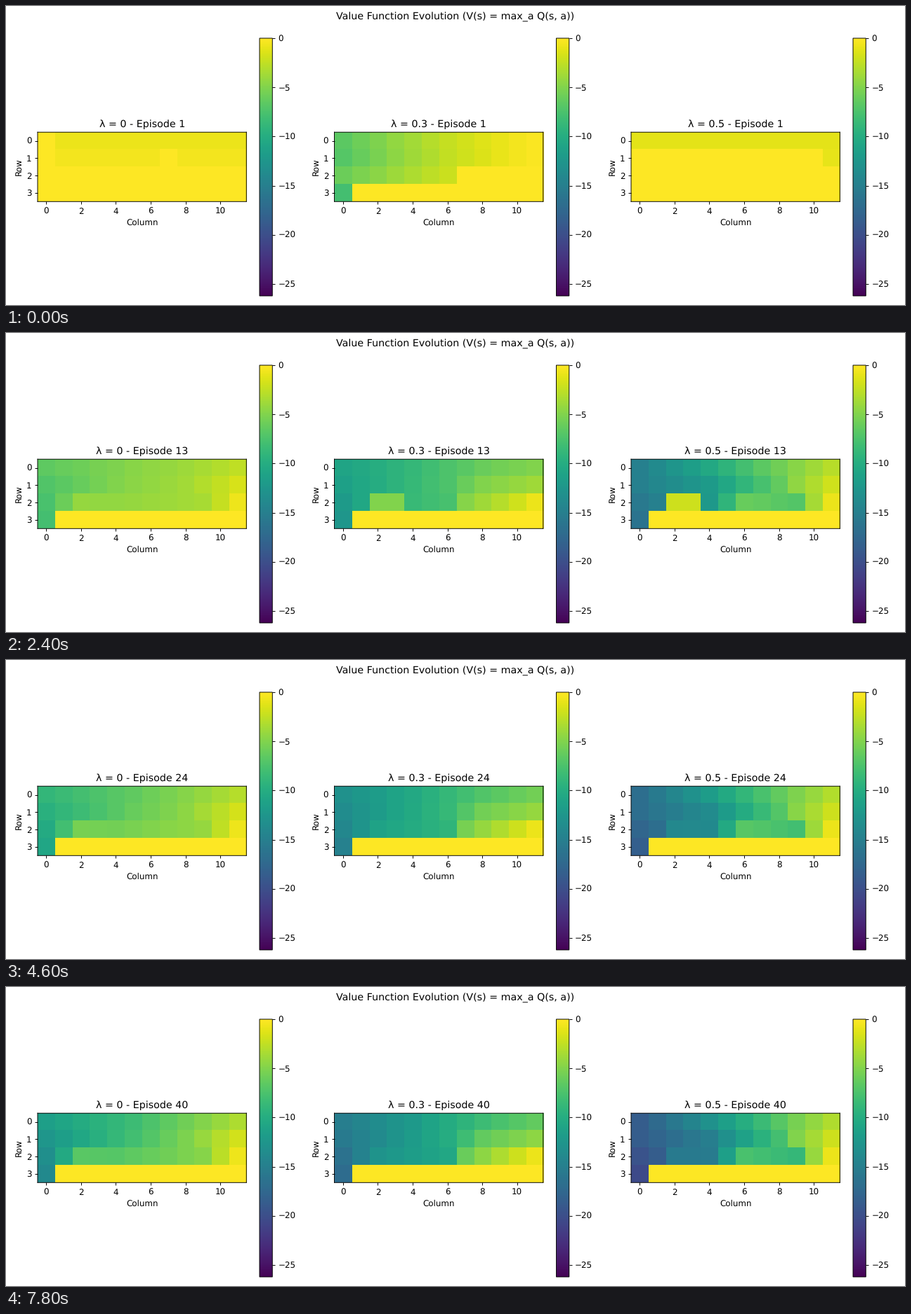
A matplotlib script for the animation above (8 s loop, 1280 by 427 pixels).

```python
import numpy as np
import matplotlib.pyplot as plt
from matplotlib.animation import FuncAnimation

# Soft, unsnapped strokes and glyphs
plt.rcParams.update({"font.family": "DejaVu Sans",
                     "path.snap": False,
                     "text.hinting": "none"})

W, H = 1280, 427
DPI = 256 / 3
FRAMES, INTERVAL = 40, 200
ROWS, COLS = 4, 12
V_MIN = -26.22
SETTLED = 7          # episodes until the whole grid has been explored
col = np.arange(COLS)


def ramp(x, start, end):
    return np.clip((x - start) / (end - start), 0, 1)


def line(*points):
    """Costs along one row, straight between (column, cost) points."""
    return np.interp(col, *zip(*points))


class Learner:
    """Cost to reach the goal from each cell, as learned over the episodes."""

    def __init__(self, lam, power, rows, start, first, late=None):
        self.lam = lam
        self.first = first
        self.late = late
        self.final = np.zeros((ROWS, COLS))
        self.final[:3] = rows
        self.final[3, 0] = start
        # cells near the goal settle sooner
        self.power = power * np.minimum(1, self.final / 8)

    def values(self, episode):
        age = max(episode, SETTLED) / FRAMES
        cost = self.final * age ** self.power
        if self.late:
            cells, begin, end, before = self.late
            k = ramp(episode, begin, end)
            cost[2, cells] = (1 - k) * before + k * cost[2, cells]
        k = ramp(np.sqrt(episode), 1, np.sqrt(SETTLED))
        return -((1 - k) * self.first + k * cost)


def top_rows(*costs):
    first = np.zeros((ROWS, COLS))
    for row, cost in enumerate(costs):
        first[row] = cost
    return first


slow_first = top_rows(0.8, 0.5)
slow_first[:2, 0] = slow_first[1, 7] = 0

fade = 6.6 * (1 - col / COLS) ** 1.5
medium_first = top_rows(fade, 1.05 * fade, 0.9 * fade * (col < 7))
medium_first[3, 0] = 7.8

fast_first = top_rows(1.1)
fast_first[1, -1] = 1

LEARNERS = [
    Learner("0", 0.5, [
        line((0, 11.4), (5, 8.2), (11, 3.2)),
        line((0, 12.4), (8, 5.2), (11, 1.8)),
        line((0, 13.2), (1, 10.3), (2, 6.7), (4, 6.9), (9, 4.8), (11, 0.7)),
    ], start=13.8, first=slow_first),
    Learner("0.3", 0.28, [
        line((0, 15), (4, 12), (8, 8.2), (11, 6.3)),
        line((0, 15.5), (6, 10), (8, 6.3), (11, 4.5)),
        line((0, 16.3), (2, 12.8), (6, 10.5), (7, 6), (8, 4.5), (11, 0.8)),
    ], start=17, first=medium_first, late=(slice(2, 4), 17, 24, 5)),
    Learner("0.5", 0.2, [
        line((0, 18.5), (4, 13), (7, 8.3), (9, 5.4), (11, 3.1)),
        line((0, 18.5), (4, 15), (6, 11.2), (8, 7.8), (9, 5), (11, 2)),
        line((0, 19.5), (1, 18.5), (2, 15.5), (4, 15.3), (6, 7.5), (9, 8.8),
             (10, 4), (11, 0.8)),
    ], start=20.3, first=fast_first, late=(slice(2, 4), 13, 20, 2)),
]

fig = plt.figure(figsize=(W / DPI, H / DPI), dpi=DPI)
fig.suptitle("Value Function Evolution (V(s) = max_a Q(s, a))")


def add_axes(x, y, w, h):
    """Place axes by pixels counted from the top left corner."""
    return fig.add_axes([x / W, 1 - (y + h) / H, w / W, h / H])


def add_panel(i):
    x = 45 + 422.5 * i
    ax = add_axes(x, 180.2, 297.3, 99.1)
    image = ax.imshow(np.zeros((ROWS, COLS)), cmap="viridis",
                      vmin=V_MIN, vmax=0, aspect="auto",
                      interpolation="nearest")
    ax.set_xticks(range(0, COLS, 2))
    ax.set_yticks(range(ROWS))
    ax.set_xlabel("Column")
    ax.set_ylabel("Row")
    bar = add_axes(x + 316, 46, 18.3, 368)
    fig.colorbar(image, cax=bar, ticks=range(-25, 1, 5))
    return ax, image


views = [add_panel(i) for i in range(len(LEARNERS))]


def draw(frame):
    episode = frame + 1
    artists = []
    for (ax, image), learner in zip(views, LEARNERS):
        image.set_data(learner.values(episode))
        title = ax.set_title(f"λ = {learner.lam} - Episode {episode}")
        artists += [image, title]
    return artists


anim = FuncAnimation(fig, draw, frames=FRAMES, interval=INTERVAL,
                     init_func=lambda: draw(0), repeat=True, repeat_delay=0)
plt.show()
```
